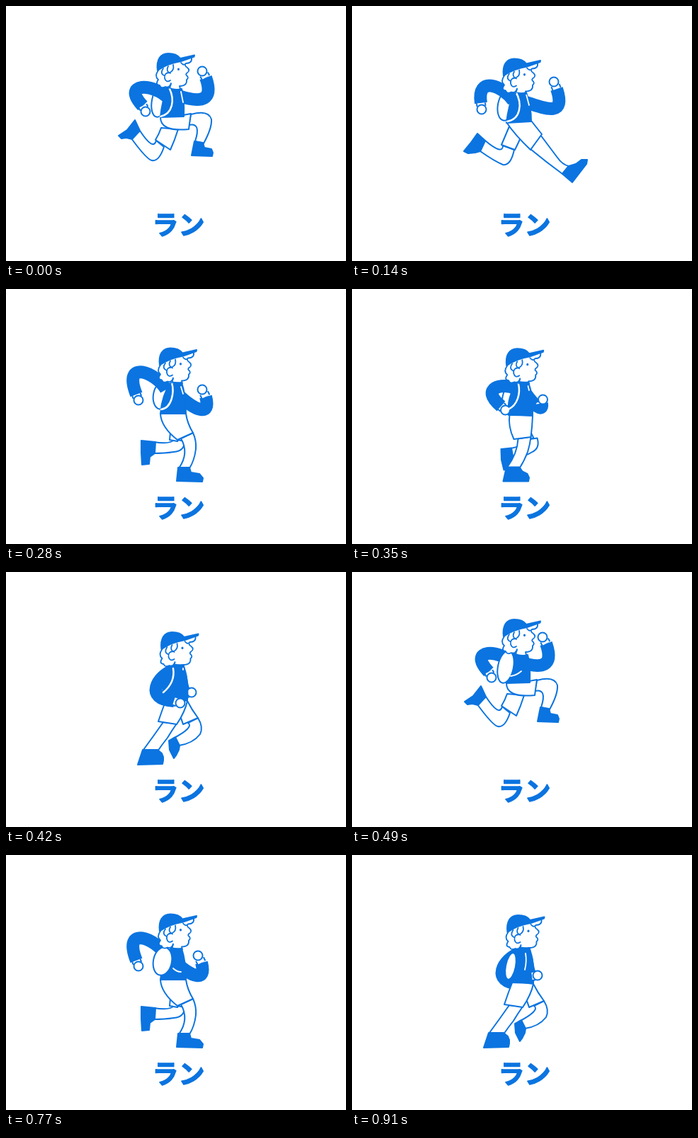
Recreate the animation shown at these times as an HTML page with a canvas. Size 480x360 px, loop 980 ms.

```html
<!DOCTYPE html>
<html lang="ja">
<head>
<meta charset="utf-8">
<title>ラン</title>
<style>
html, body { margin: 0; width: 100%; height: 100%; overflow: hidden; background: #fff; }
canvas { display: block; }
</style>
</head>
<body>
<canvas id="stage" width="480" height="360"></canvas>
<script>
const ctx = document.getElementById('stage').getContext('2d');
const BLUE = '#0b74e0', WHITE = '#fff';
const STEP = 70, STRIDE = 7;

// Each part has four key poses per stride: push-off, reach, landing, passing.
const leadSkin = [
  'M261 153Q286 146 290 160Q291 172 279 194L267 191Q276 164 258 168',
  'M266 182Q278 198 290 214Q297 224 306 226L297 237Q275 221 252 202',
  'M264 203Q269 214 268 226Q266 242 259 253L244 253Q259 232 247 211',
  'M241 214Q234 224 228 234Q220 244 214 253L194 251Q208 232 222 212'];
const leadShoe = [
  'M278 193 280 200 290 202 292 207 291 212 262 211 266 191',
  'M306 226 316 223 324 217 332 217 331 223 311 249 297 237',
  'M259 252 261 259 273 261 278 267 277 272 241 271 243 252',
  'M214 251 220 256 222 261 222 266 221 271 186 272 193 251'];
const leadShorts = [
  'M218 156Q217 178 258 174L261 152Q256 153 250 154',
  'M218 164Q229 181 252 203L268 181Q260 171 253 162',
  'M218 176Q219 195 242 213L264 203Q256 190 254 176',
  'M227 178Q221 193 215 211L241 215Q253 197 256 182'];
const trailSkin = [
  'M223 199Q216 220 206 218Q199 217 177 187L189 176Q208 205 212 190',
  'M229 203Q224 226 213 224Q201 219 181 205L188 190Q213 211 213 197',
  'M252 215Q252 229 237 230Q224 232 208 232L209 216Q232 220 238 212',
  'M271 206Q279 219 274 229Q264 242 244 245L236 235Q266 219 257 213'];
const trailShoe = [
  'M178 188 170 186 163 187 159 183 171 175 182 161 189 176',
  'M181 205 174 207 164 208 158 205 167 194 177 180 188 190',
  'M210 232 203 237 202 247 192 248 191 231 191 214 211 216',
  'M245 245 244 251 240 259 237 263 231 251 230 238 239 233'];
const trailShorts = [
  'M219 172Q216 181 211 189L232 203Q238 190 243 174',
  'M222 170Q217 182 211 196L230 203Q234 195 238 186',
  'M232 198Q232 205 231 213L242 215Q243 214 245 210',
  'M240 190Q247 205 250 215L271 206Q262 194 256 182'];
const torso = [
  'M228 114Q238 120 248 117Q252 130 251 156L218 157Q220 135 228 114',
  'M229 121Q238 125 246 122Q253 140 253 163L218 165Q221 140 229 121',
  'M233 131Q240 133 248 132Q254 150 254 176L218 176Q220 150 233 131',
  'M235 130Q242 132 250 131Q258 150 256 181L224 180Q216 155 235 130'];

// Arms: shoulder, two controls, wrist, hand.
const backArm = [
  '230 131 208 108 162 108 193 141 197 149',
  '228 134 212 112 176 98 182 137 183 146',
  '226 142 212 118 164 98 184 149 187 157',
  '236 139 214 146 194 180 237 182 246 185'];
const frontArm = [
  '244 127 278 138 293 132 282 101 277 92',
  '246 136 275 146 302 156 289 117 285 107',
  '246 152 266 170 290 182 282 152 277 142',
  '246 145 248 158 250 168 254 171 262 170'];
const nearShift = ['-8', '-14', '-6', '0'];
const pack = ['217 134 11 23', '218 140 12 22', '221 150 13 20', '224 157 7 19'];
const strap = [
  'M231 117C238 132 236 152 218 156', 'M231 121C241 138 238 160 219 163',
  'M234 132C238 146 234 168 219 170', 'M236 136C238 148 234 160 222 170'];
const armpit = ['M247 121 250 136', 'M246 125 250 140', 'M247 138 250 148', 'M250 136 250 138'];
const crease = [
  'M224 147Q232 146 239 140', 'M222 152Q231 151 239 146',
  'M236 160Q241 165 247 165', 'M245 139Q247 150 244 162'];
const headShift = ['0 0', '0 7.5', '3 16.5', '5.5 18'];

// Odd poses lie halfway between two key poses.
function at(keys, pose) {
  const i = pose >> 1;
  if (pose % 2 === 0) return keys[i];
  const next = keys[i + 1].match(/-?[\d.]+/g);
  let n = 0;
  return keys[i].replace(/-?[\d.]+/g, v => (+v + +next[n++]) / 2);
}
const numbers = (keys, pose) => at(keys, pose).split(' ').map(Number);

function shape(d, fill, width = 2, color = BLUE) {
  const path = new Path2D(d);
  if (fill) {
    ctx.fillStyle = fill;
    ctx.fill(path);
  }
  ctx.strokeStyle = color;
  ctx.lineWidth = width;
  ctx.stroke(path);
}

function arm(keys, pose, shift = 0) {
  const [sx, sy, ax, ay, bx, by, wx, wy, hx, hy] = numbers(keys, pose);
  ctx.save();
  ctx.translate(shift, 0);
  ctx.lineCap = 'butt';
  shape(`M${sx} ${sy}C${ax} ${ay} ${bx} ${by} ${wx} ${wy}`, null, 18);
  const cuff = `M${wx} ${wy}L${(wx + hx) / 2} ${(wy + hy) / 2}`;
  shape(cuff, null, 14);
  shape(cuff, null, 10, WHITE);
  shape(`M${hx - 6.5} ${hy}a6.5 6.5 0 1 0 13 0a6.5 6.5 0 1 0 -13 0`, WHITE);
  ctx.restore();
}

function leg(skin, shoe, shorts, pose) {
  shape(at(skin, pose) + 'Z', WHITE);
  shape(at(shoe, pose) + 'Z', BLUE);
  shape(at(shorts, pose) + 'Z', WHITE);
}

function backpack(pose) {
  const [x, y, rx, ry] = numbers(pack, pose);
  ctx.beginPath();
  ctx.ellipse(x, y, rx, ry, 0.2, 0, 7);
  ctx.fillStyle = WHITE;
  ctx.strokeStyle = BLUE;
  ctx.lineWidth = 2;
  ctx.fill();
  ctx.stroke();
}

function head(pose) {
  ctx.save();
  ctx.translate(...numbers(headShift, pose));
  // face and neck
  shape('M253 80Q252 85 256 87Q261 91 255 95Q253 97 256 99Q258 102 255 104Q256 113 245 113L246 117M233 110L231 116', null, 1.8);
  // curls and ear
  shape('M215 91Q209 99 215 104Q210 111 217 112Q219 117 225 114Q231 116 233 109', WHITE, 1.8);
  shape('M222 88Q217 95 223 98M229 85Q225 92 232 95M236 83Q238 91 231 94Q223 94 224 102Q226 109 232 105', null, 1.8);
  shape('M262 73Q263 81 254 81Q251 85 247 80', WHITE, 1.8);
  shape('M243.5 89L243.5 89.4', null, 3);
  // cap
  shape('M214 91C212 76 218 67 229 67Q241 67 246 74L266 69.5 265.5 71.5 247 78Q228 81 214 91Z', BLUE, 2);
  ctx.restore();
}

function lettering() {
  ctx.font = '900 37px "Noto Sans CJK JP", "Noto Sans CJK", sans-serif';
  ctx.textAlign = 'center';
  ctx.fillStyle = ctx.strokeStyle = BLUE;
  ctx.lineWidth = 1.4;
  ctx.fillText('ラン', 243.5, 323);
  ctx.strokeText('ラン', 243.5, 323);
}

function draw(now) {
  const step = Math.floor(now / STEP) % (2 * STRIDE);
  const pose = step % STRIDE;
  const nearArmBack = step < STRIDE;
  ctx.fillStyle = WHITE;
  ctx.fillRect(0, 0, 480, 360);
  ctx.lineJoin = ctx.lineCap = 'round';

  arm(nearArmBack ? frontArm : backArm, pose);
  leg(trailSkin, trailShoe, trailShorts, pose);
  leg(leadSkin, leadShoe, leadShorts, pose);
  if (nearArmBack) backpack(pose);
  shape(at(torso, pose) + 'Z', BLUE);
  if (nearArmBack) {
    shape(at(armpit, pose), null, 1.8, WHITE);
    arm(backArm, pose);
    shape(at(strap, pose), null, 2.5, WHITE);
  } else {
    arm(frontArm, pose, +at(nearShift, pose));
    backpack(pose);
    shape(at(crease, pose), null, 1.8, WHITE);
  }
  head(pose);
  lettering();
  requestAnimationFrame(draw);
}
requestAnimationFrame(draw);
</script>
</body>
</html>
```
